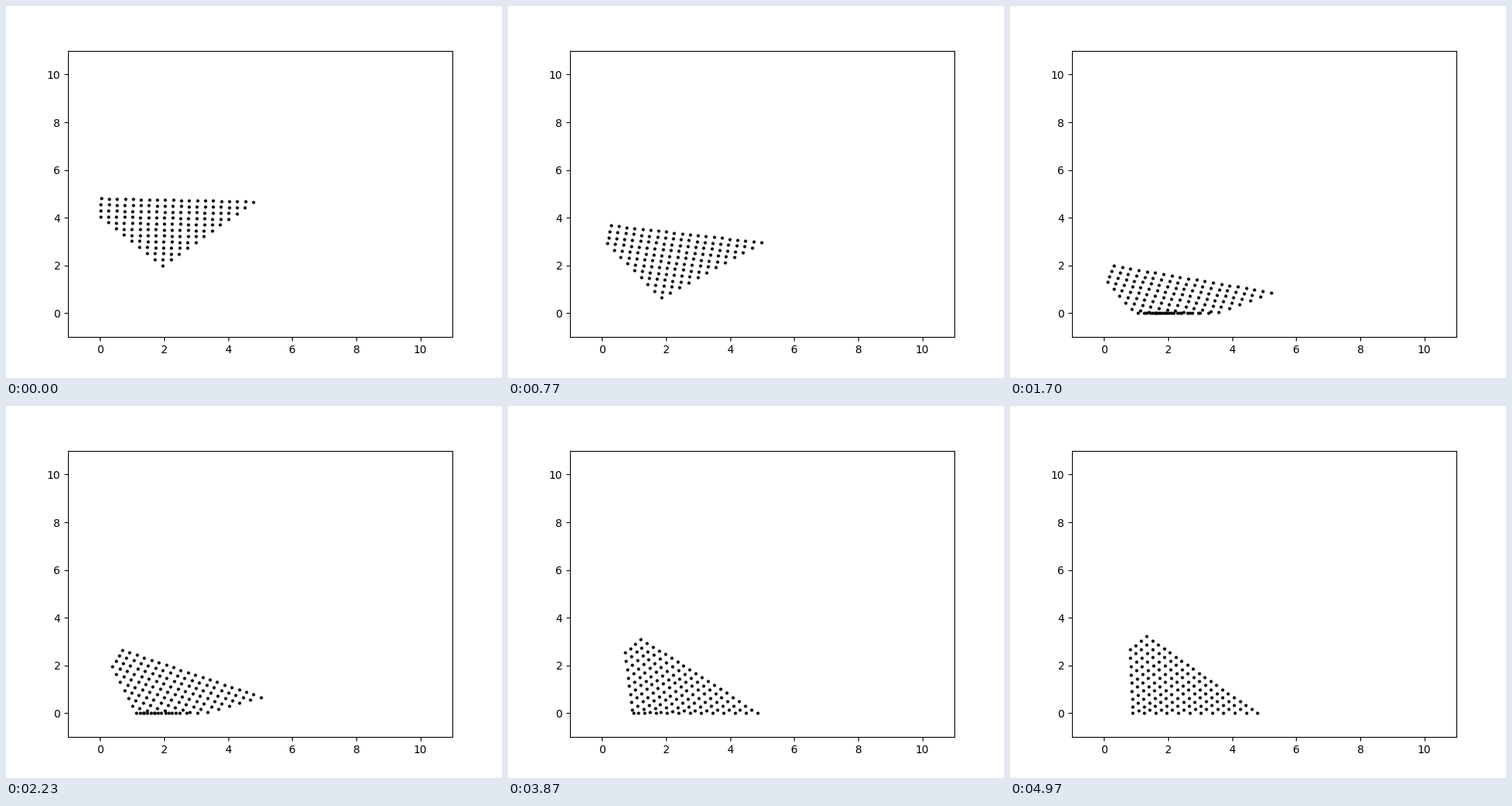
Write a matplotlib script that moves like this. It is 640 by 480 pixels and loops after 5.01 s.

```python
import numpy as np
import matplotlib.pyplot as plt
from matplotlib.animation import FuncAnimation

TICK_MS = 15
TICKS = 334
STEPS = 150
STEP_MS = 100 / 3

# Triangular block of lattice dots, measured from its centre of mass
cells = [(i, m) for i in range(20) for m in range(12) if m >= abs(i - 8)]
X, Y = 0.25 * np.array(cells).T
X, Y = X - X.mean(), Y - Y.mean()


def after(n, start, width):
    """Time since start, with a rounded corner."""
    return width * np.logaddexp(0, (n - start) / width)


def dots(n):
    """A soft block falls, squashes on the floor and tips onto its side."""
    spin = 1 - np.exp(-n / 10)
    tip = 1 - np.exp(-after(n, 46, 4) / 39)
    squash = 0.07 * np.exp(-((n - 49) / 8) ** 2)
    settle = max(n - 67, 0) / 24

    # Centre of mass: free fall, then a dip and a slow rise on the floor
    cx = 2.11 + 0.125 * spin
    fall = 3.835 - 0.0418 * n - 0.000785 * n ** 2
    rest = 0.93 + 0.22 * tip ** 3
    cy = rest + 0.1 * np.logaddexp(0, (fall - rest) / 0.1) - 4 * squash

    a = -np.radians(1.6 + 7.7 * spin + 36.5 * tip)
    droop = 0.04 * settle * np.exp(1 - settle) * np.maximum(X, 0) ** 2
    x = cx + (1 + squash) * (X * np.cos(a) - Y * np.sin(a))
    y = cy + (1 - squash) * (X * np.sin(a) + Y * np.cos(a)) - droop

    # Weight presses the lower rows together against the floor
    press = 0.125 * (1 - np.exp(-0.6 * settle))
    return x, np.maximum(y + press * np.exp(-y / 0.8), 0)


fig, ax = plt.subplots(figsize=(6.4, 4.8), dpi=100)
ax.set_xlim(-1, 11)
ax.set_ylim(-1, 11)
body, = ax.plot([], [], "ko", ms=2)


def update(tick):
    step = min(int((tick + 1) * TICK_MS / STEP_MS), STEPS - 1)
    body.set_data(*dots(step))
    return body,


anim = FuncAnimation(fig, update, frames=TICKS, interval=TICK_MS,
                     repeat=True, repeat_delay=0, blit=False)
plt.show()
```
